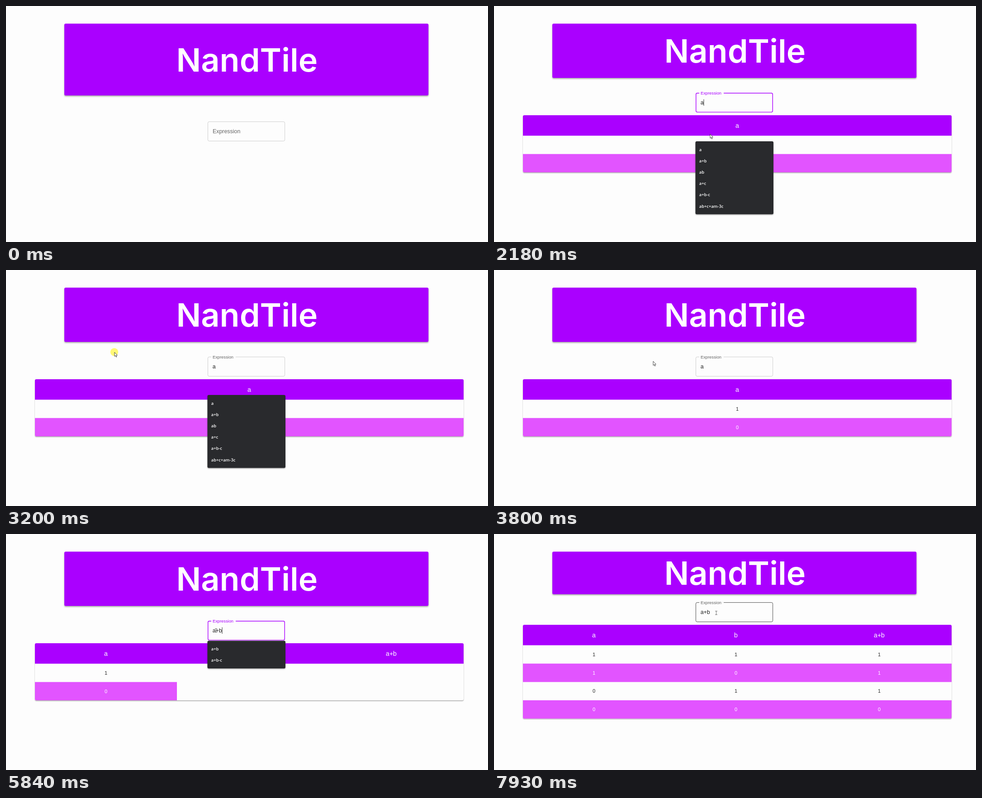
Animation, 1066 px wide and 525 px high, one loop 8000 ms. Source, as an HTML page with a canvas:

```html
<!DOCTYPE html>
<html lang="en">
<head>
<meta charset="utf-8">
<title>Truth tables</title>
<style>
html, body { margin: 0; width: 100%; height: 100%; overflow: hidden; background: #fdfdfd; }
canvas { display: block; }
</style>
</head>
<body>
<canvas id="stage" width="1066" height="525"></canvas>
<script>
const ctx = document.getElementById('stage').getContext('2d');
const LOOP = 8000;
const PAPER = '#fdfdfd', PURPLE = '#aa00ff', PINK = '#e254ff', INK = 'rgba(0,0,0,.87)';
const SANS = '"Liberation Sans", Arial, sans-serif';
const LAYOUTS = [
  { banner: 160, title: 145.5, field: 257 },
  { banner: 121, title: 125.5, field: 193, table: 243 },
  { banner: 95, title: 112.5, field: 152, table: 202 },
];
const OPTIONS = ['a', 'a+b', 'ab', 'a+c', 'a+b-c', 'ab+c+am-3c'];
const CLICKS = [1610, 3130, 4680, 7150];
// Pointer moves: first step, last step, number of steps, destination
const MOVES = [
  [290, 440, 3, 485, 375],
  [820, 820, 1, 465, 305],
  [990, 1230, 4, 478, 285],
  [2570, 2880, 5, 240, 183],
  [3800, 3800, 1, 352, 203],
  [3880, 4040, 3, 440, 229],
  [4120, 4360, 4, 464, 214],
  [6450, 6450, 1, 441, 205],
  [6620, 6920, 5, 387, 187],
  [7620, 7930, 5, 491, 175],
];

const within = (t, a, b) => t >= a && t < b;

function pointerAt(t) {
  let x = 795, y = 495;
  for (const [start, end, steps, toX, toY] of MOVES) {
    if (t < start) break;
    const pace = (end - start) / (steps - 1) || 1;
    const done = Math.min(steps, Math.floor((t - start) / pace + 1e-6) + 1) / steps;
    x += (toX - x) * done;
    y += (toY - y) * done;
  }
  return { x, y };
}

function write(str, x, y, font, color, align = 'left') {
  ctx.font = font;
  ctx.fillStyle = color;
  ctx.textAlign = align;
  ctx.fillText(str, x, y);
}

function rect(x, y, w, h, color) {
  ctx.fillStyle = color;
  ctx.fillRect(x, y, w, h);
}

function card(x, y, w, h, color, depth) {
  ctx.save();
  ctx.shadowColor = 'rgba(0,0,0,.35)';
  ctx.shadowBlur = depth * 1.6;
  ctx.shadowOffsetY = depth;
  ctx.fillStyle = color;
  ctx.beginPath();
  ctx.roundRect(x, y, w, h, 3);
  ctx.fill();
  ctx.restore();
}

function drawTable(top, heads, rows, edges) {
  const height = 45.5 + 40.8 * rows.length;
  card(64, top, 948, height, PAPER, 1.3);
  ctx.save();
  ctx.beginPath();
  ctx.roundRect(64, top, 948, height, 3);
  ctx.clip();
  rect(64, top, 948, 45.5, PURPLE);
  const center = i => (edges[i] + edges[i + 1]) / 2;
  heads.forEach((head, i) => write(head, center(i), top + 27.5, '14.1px ' + SANS, '#fff', 'center'));
  rows.forEach((row, r) => {
    const y = top + 45.5 + 40.8 * r;
    [...row].forEach((digit, i) => {
      if (r % 2) rect(edges[i], y, edges[i + 1] - edges[i], 41, PINK);
      write(digit, center(i), y + 24.2, '11px ' + SANS, r % 2 ? '#fff' : INK, 'center');
    });
  });
  ctx.restore();
}

function drawField(y, s) {
  if (s.preview) rect(447, y + 1, 169, 42, '#e8f0fe');
  const line = s.focus ? 1.4 : 0.8;
  ctx.lineWidth = line;
  ctx.strokeStyle = s.focus ? PURPLE : s.hover ? INK : 'rgba(0,0,0,.23)';
  ctx.beginPath();
  ctx.roundRect(446 + line / 2, y + line / 2, 171 - line, 43.8 - line, 3);
  ctx.stroke();
  if (s.float === 1) rect(454, y - 0.5, 54, 2.6, PAPER);
  const labelColor = s.focus ? (s.float < 1 ? '#8d55ae' : PURPLE) : 'rgba(0,0,0,.6)';
  write('Expression', 457, y + 26 - 22.4 * s.float, 12.4 - 3.1 * s.float + 'px ' + SANS, labelColor);
  const size = s.preview ? 10.6 : 12.4;
  write(s.text, 456.7, y + 26, size + 'px ' + SANS, INK);
  if (s.caret) rect(456.6 + ctx.measureText(s.text).width, y + 14.5, 0.9, 14.5, '#222');
}

function drawMenu(top, options, active) {
  card(445.5, top, 172.5, options.length * 25.2 + 11, '#292a2d', 1.5);
  if (active) rect(445.5, top + 5.6, 172.5, 25.2, '#3f4042');
  options.forEach((option, i) =>
    write(option, 453.8, top + 21.6 + i * 25.2, '600 9.3px "Open Sans", sans-serif', '#fff'));
}

function drawPointer({ x, y }, beam) {
  ctx.save();
  ctx.translate(x, y);
  ctx.beginPath();
  if (beam) {
    ctx.lineWidth = 0.8;
    ctx.strokeStyle = '#555';
    for (const [ax, ay, bx, by] of [[-2, -3.5, 3, -3.5], [0.5, -3.5, 0.5, 4.5], [-2, 4.5, 3, 4.5]]) {
      ctx.moveTo(ax, ay);
      ctx.lineTo(bx, by);
    }
    ctx.stroke();
  } else {
    for (const [px, py] of [[0, 0], [0, 9.2], [2.1, 7.3], [3.6, 10.7], [5, 10.1], [3.6, 6.9], [6.3, 6.7]]) ctx.lineTo(px, py);
    ctx.closePath();
    ctx.lineWidth = 0.8;
    ctx.strokeStyle = '#222';
    ctx.fillStyle = '#fff';
    ctx.fill();
    ctx.stroke();
  }
  ctx.restore();
}

function draw(t) {
  const layout = LAYOUTS[t < 2180 ? 0 : t < 5910 ? 1 : 2];
  const pointer = pointerAt(t);
  const hover = pointer.x > 446 && pointer.x < 617 &&
    pointer.y > layout.field && pointer.y < layout.field + 44;
  const focus = within(t, 1610, 3130) || within(t, 4680, 7150);
  const preview = within(t, 2340, 2570);
  const blink = within(t, 5210, 5460) || within(t, 6380, 6920);
  const text = t < 2180 ? '' : t < 5460 ? 'a' : t < 5840 ? 'a+' : 'a+b';

  rect(0, 0, 1066, 525, PAPER);
  card(129, 39.3, 805.3, layout.banner - 0.3, PURPLE, 2);
  write('NandTile', 533, layout.title, '600 72px Inter, sans-serif', '#fff', 'center');

  if (layout.table) {
    const wide = t >= 5840;
    const rows = t < 5910 ? ['1', '0'] : ['111', '101', '011', '000'];
    drawTable(layout.table, wide ? ['a', 'b', 'a+b'] : ['a'], rows, wide ? [64, 378, 692, 1012] : [64, 1012]);
  }

  const float = t < 1610 ? 0 : t < 1700 ? 0.25 : t < 1780 ? 0.85 : 1;
  drawField(layout.field, { text, focus, hover, preview, float, caret: focus && !preview && !blink });

  if (within(t, 1780, 3210)) drawMenu(t < 2260 ? 301 : 278, OPTIONS, preview);
  if (within(t, 4760, 7230)) drawMenu(237.5, OPTIONS.filter(option => option.startsWith(text)), false);

  if (CLICKS.some(click => within(t, click, click + 160))) {
    ctx.fillStyle = 'rgba(255,245,60,.7)';
    ctx.beginPath();
    ctx.arc(pointer.x - 0.5, pointer.y - 0.5, 8.7, 0, 7);
    ctx.fill();
  }
  if (t >= 290) drawPointer(pointer, hover);
}

const begin = performance.now();
function tick() {
  draw((performance.now() - begin) % LOOP);
  requestAnimationFrame(tick);
}
tick();
</script>
</body>
</html>
```
